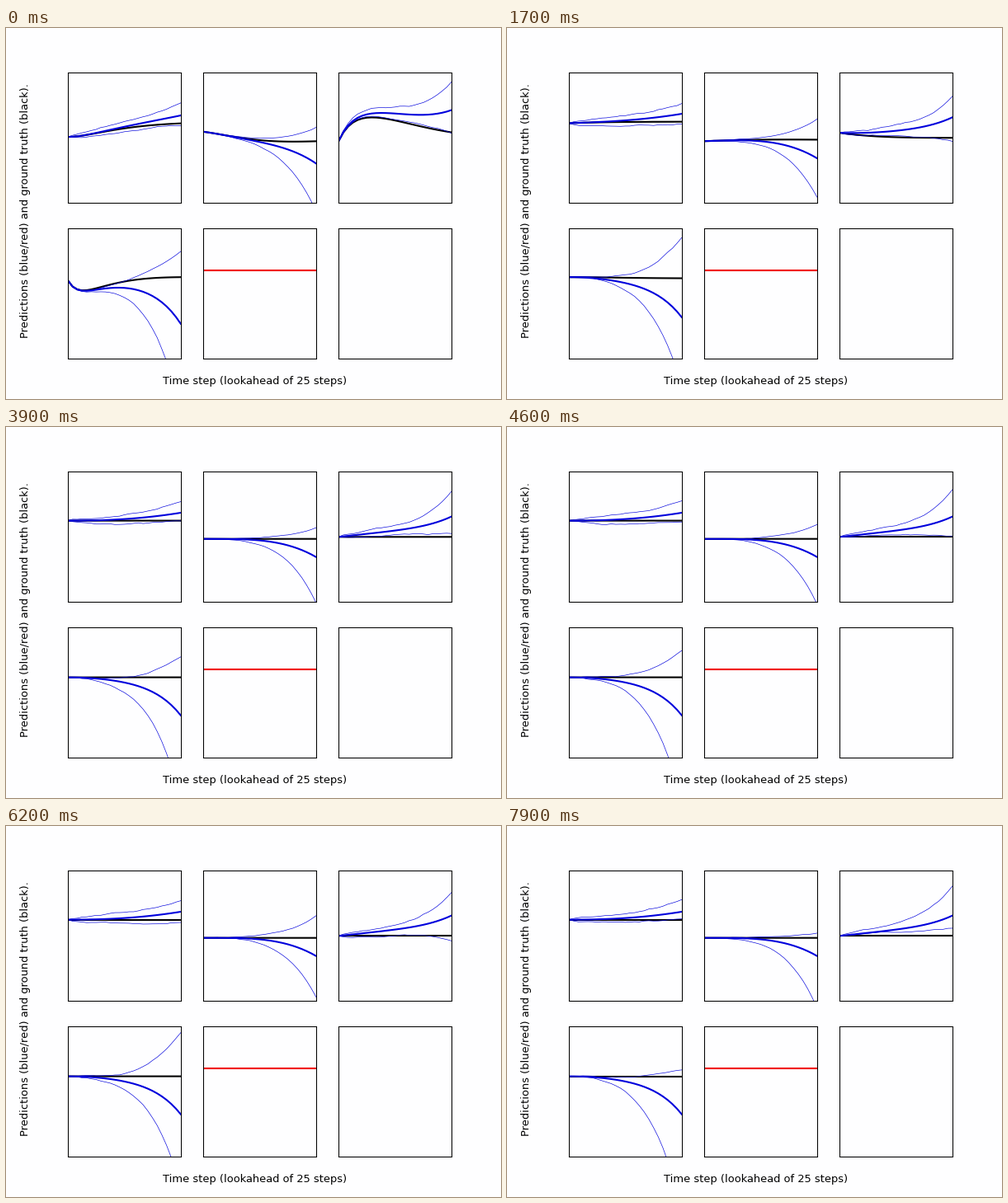
Animation of 600x450 px, one loop 8000 ms. Source, as a matplotlib script:

```python
import numpy as np
import matplotlib.pyplot as plt
from matplotlib.animation import FuncAnimation
from numpy import cos, exp

FRAMES, INTERVAL = 80, 100
STEPS = np.arange(25)
R = STEPS / 24
RATE = 1.45  # trajectory steps per frame
PAPER, BLUE, RED = "#fefeff", "#0000dc", "#f00000"


def blend(a, p, q):
    """Growth from 0 to 1: a slow power and a fast power."""
    return a * R**p + (1 - a) * R**q


# True trajectories, each settling to rest; heights run down the stage.
def rise(s):
    return 113 + 18.5 * (1 + s / 6.4) * exp(-s / 6.4)


def sag(s):
    return 135.1 - 9.9 * exp(-s / 13.5) * cos(.138 * s)


def hump(s):
    return 132.7 - 32 * exp(-.0027 * s**2) + 35.8 * exp(-s / 2.9)


def dip(s):
    return 303 + 28.9 * exp(-s / 9.8) * cos(.09 * s) - 26.4 * exp(-s / 2)


class Panel:
    """Truth, prediction and the two bounds around the prediction.

    drift: final offset of the prediction, and its extra at the start
    up, low: mean final spread; shift, width: how far chance moves it
    """

    def __init__(self, ax, truth, drift, drift_shape, up, low, shift, width,
                 spread_shape, rough):
        self.truth, self.drift, self.rough = truth, drift, rough
        self.drift_shape = blend(*drift_shape)
        self.spread_shape = blend(*spread_shape)
        self.up, self.low, self.shift, self.width = up, low, shift, width
        styles = ("k", 1.6), (BLUE, 1.6), (BLUE, .5), (BLUE, .5)
        self.lines = [ax.plot(STEPS, STEPS, color=c, lw=w)[0] for c, w in styles]

    def update(self, frame, shift, width, rng):
        end, extra = self.drift
        truth = self.truth(STEPS + RATE * frame)
        mean = truth + (end + extra * exp(-frame / 8)) * self.drift_shape
        up = self.up + self.width * width - self.shift * shift
        low = self.low + self.width * width + self.shift * shift
        upper = mean - up * self.spread_shape + wiggle(rng, self.rough)
        lower = mean + low * self.spread_shape + wiggle(rng, self.rough)
        for line, y in zip(self.lines, (truth, mean, upper, lower)):
            line.set_ydata(y)


def wiggle(rng, size):
    """Random walk that starts and ends at zero."""
    walk = np.cumsum(rng.normal(0, size, 25)) 
    walk -= walk[0]
    return walk - R * walk[-1]


fig, axes = plt.subplots(2, 3, figsize=(6.4, 4.8), dpi=93.75, facecolor=PAPER)
for row, top in zip(axes, (53.4, 242.4)):
    for ax in row:
        ax.set(xlim=(0, 24), ylim=(top + 157.5, top), xticks=[], yticks=[],
               facecolor=PAPER)
fig.text(.502, .04, "Time step (lookahead of 25 steps)", ha="center", size=10)
fig.text(.04, .508, "Predictions (blue/red) and ground truth (black).",
         ha="center", va="center", rotation="vertical", size=10)

panels = [
    Panel(axes[0, 0], rise, drift=(-9.6, 0), drift_shape=(1, 2.3, 1),
          up=13.5, low=11, shift=-1, width=1.2,
          spread_shape=(.7, .6, 5), rough=.4),
    Panel(axes[0, 1], sag, drift=(22, 5), drift_shape=(1, 3.6, 1),
          up=40, low=54, shift=6, width=3,
          spread_shape=(.1, 1.5, 3.9), rough=.2),
    Panel(axes[0, 2], hump, drift=(-24.7, -2.3), drift_shape=(.6, 1, 5),
          up=30, low=24, shift=-4, width=3,
          spread_shape=(.3, .6, 4.5), rough=.4),
    Panel(axes[1, 0], dip, drift=(46, 10.5), drift_shape=(.5, 2, 5.5),
          up=80, low=98, shift=13, width=6,
          spread_shape=(.2, 1.8, 4), rough=.35),
]
axes[1, 1].axhline(293.6, color=RED, lw=1.6)


def update(frame):
    rng = np.random.default_rng(frame + 11)
    shift, width = np.clip(rng.normal(size=2), -1.8, 1.8)
    for panel in panels:
        panel.update(frame, shift, width, rng)
    return [line for panel in panels for line in panel.lines]


anim = FuncAnimation(fig, update, frames=FRAMES, interval=INTERVAL, repeat=True)
plt.show()
```
